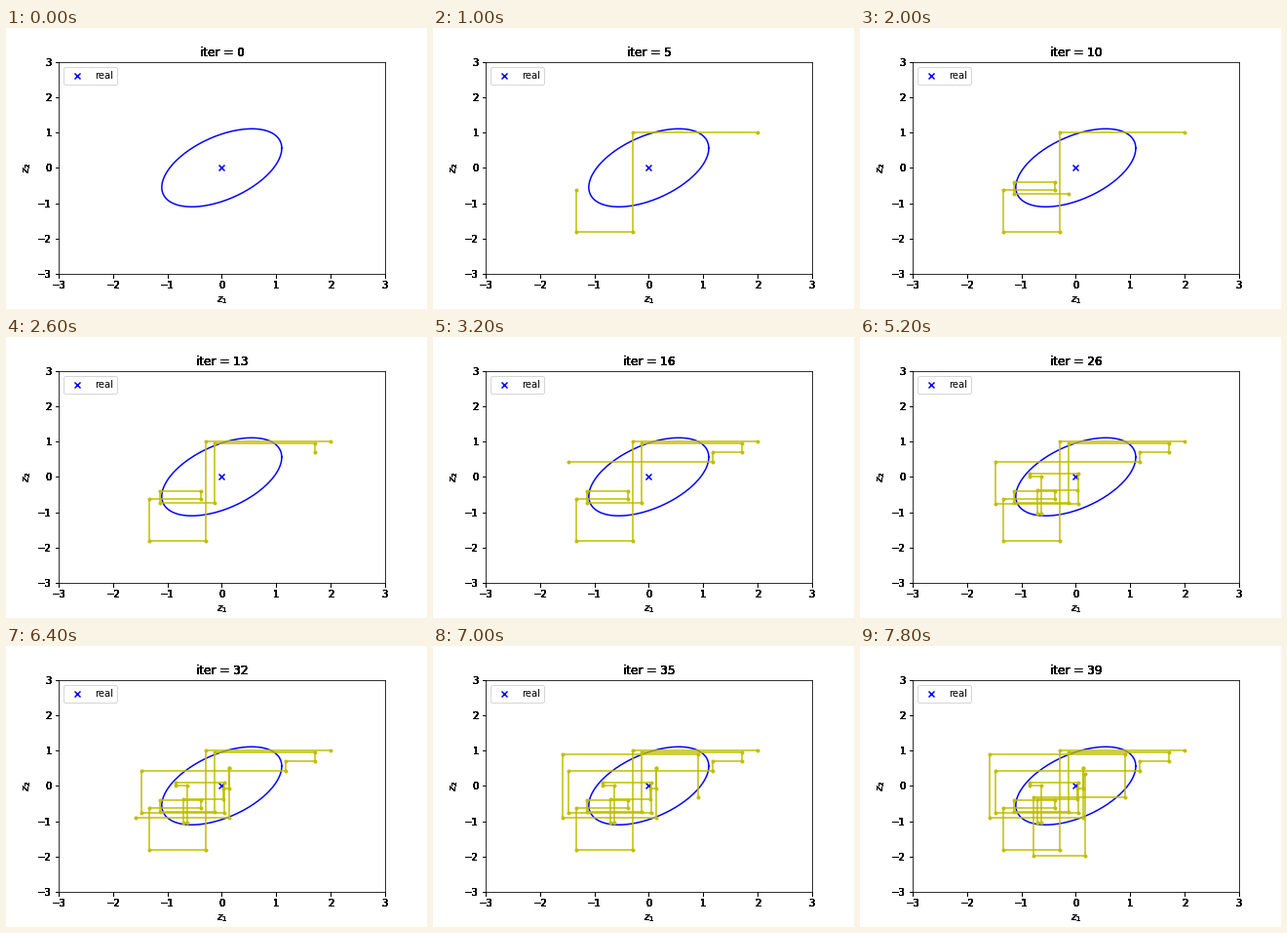
Write a matplotlib script that moves like this. It is 432x288 px and loops after 8000 ms.

```python
import numpy as np
import matplotlib.pyplot as plt
from matplotlib.animation import FuncAnimation

RHO = 0.5          # correlation of the normal density
LEVEL = 0.1        # density shown by the contour
STEPS = 40

# Alternating draws of a Gibbs sampler: z1, z2, z1, z2, ...
DRAWS = [2, 1, -.29, -1.82, -1.33, -.62, -.38, -.40, -1.14, -.74,
         -.13, .94, 1.72, .70, 1.18, .42, -1.48, -.76, .05, .09,
         -.85, .02, -.63, -1.03, -.70, -.37, .02, -.07, .14, .50,
         .13, -.91, -1.59, .90, .91, -.32, -.78, -1.97, .17, .34]


def chain(draws):
    """Each new draw replaces one coordinate of the previous state."""
    state = list(draws[:2])
    path = [tuple(state)]
    for k, value in enumerate(draws[2:]):
        state[k % 2] = value
        path.append(tuple(state))
    return np.array(path)


def harden(artist, times=12):
    """Overdraw an artist so its soft edges turn solid."""
    draw = artist.draw

    def repeat(renderer):
        for _ in range(times):
            draw(renderer)

    artist.draw = repeat


def contour_curve():
    peak = 1 / (2 * np.pi * np.sqrt(1 - RHO ** 2))
    radius = np.sqrt(2 * np.log(peak / LEVEL))
    t = np.linspace(0, 2 * np.pi, 200)
    x = radius * np.cos(t)
    y = radius * (RHO * np.cos(t) + np.sqrt(1 - RHO ** 2) * np.sin(t))
    return x, y


path = chain(DRAWS)

fig, ax = plt.subplots(figsize=(6, 4), dpi=72, facecolor="white")
fig.subplots_adjust(left=0.125, right=0.9, bottom=0.125, top=0.88)
ax.plot(*contour_curve(), color="b", lw=1.5)
ax.scatter(0, 0, marker="x", color="b", label="real")
trace, = ax.plot([], [], "y.-")

ax.set(xlim=(-3, 3), ylim=(-3, 3), xlabel="$z_1$", ylabel="$z_2$")
ax.set_xticks(range(-3, 4))
ax.set_yticks(range(-3, 4))
ax.legend(loc="upper left")
title = ax.set_title("iter = 0")

for axis in (ax.xaxis, ax.yaxis):
    harden(axis.label)
    for tick in axis.get_major_ticks():
        harden(tick.label1)
        harden(tick.tick1line)
harden(title)


def update(i):
    trace.set_data(path[:i, 0], path[:i, 1])
    title.set_text(f"iter = {i}")
    return trace, title


anim = FuncAnimation(fig, update, frames=STEPS, interval=200,
                     repeat=True, repeat_delay=0, blit=False)
plt.show()
```
